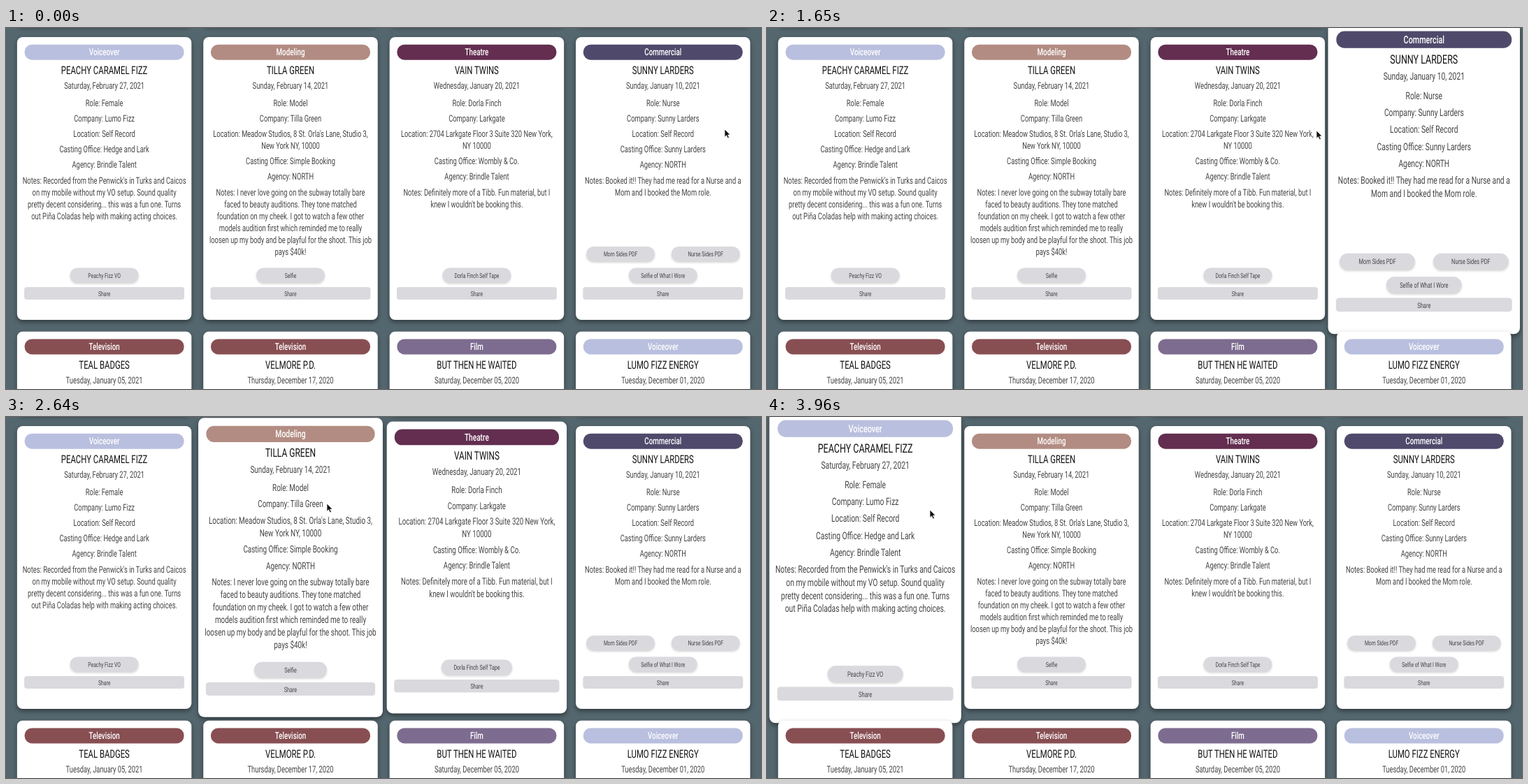
An HTML page that plays this animation: 1080 px wide and 517 px high, repeating every 4.07 s.

```html
<!DOCTYPE html>
<html lang="en">
<head>
<meta charset="utf-8">
<title>Audition cards</title>
<style>
  html, body { margin: 0; width: 100%; height: 100%; overflow: hidden; background: #54666e; }
  svg { display: block; width: 100%; height: 100%; }
  text { font: 400 13.2px Roboto, "Open Sans", sans-serif; fill: #444; text-anchor: middle; text-rendering: geometricPrecision; }
  .tag { font-size: 13.8px; font-weight: 500; fill: #fff; }
  .title { font-size: 16px; fill: #111; }
  .label { font-size: 9.6px; }
  .sheet { fill: #fff; filter: drop-shadow(0 3px 3px rgba(0, 0, 0, .42)); }
  .button { fill: #dad9de; filter: drop-shadow(0 2px 1.5px rgba(0, 0, 0, .17)); }
  .share { fill: #dad9de; }
  .zoom { transform-origin: 0 215.5px; }
</style>
</head>
<body>
<svg id="stage" viewBox="0 0 1080 517"></svg>
<script>
const LOOP = 4070, TICK = 110, CONDENSE = 0.71, ROW = 421.7;
const stage = document.getElementById('stage');
const columnX = i => 140.6 + i * 266.4;

const tagColors = {
  Voiceover: '#b9bfde', Modeling: '#b28c82', Theatre: '#632e50',
  Commercial: '#4f4a6b', Television: '#884f53', Film: '#7e6c90'
};

// Each detail is a paragraph; "|" breaks a line. Buttons are [label, x, y].
const cards = [
  { tag: 'Voiceover', title: 'PEACHY CARAMEL FIZZ', date: 'Saturday, February 27, 2021',
    details: ['Role: Female', 'Company: Lumo Fizz', 'Location: Self Record',
      'Casting Office: Hedge and Lark', 'Agency: Brindle Talent',
      "Notes: Recorded from the Penwick's in Turks and Caicos|on my mobile without my VO setup. Sound quality|pretty decent considering... this was a fun one. Turns|out Piña Coladas help with making acting choices."],
    buttons: [['Peachy Fizz VO', 0, 354]] },
  { tag: 'Modeling', title: 'TILLA GREEN', date: 'Sunday, February 14, 2021',
    details: ['Role: Model', 'Company: Tilla Green',
      "Location: Meadow Studios, 8 St. Orla's Lane, Studio 3,|New York NY, 10000",
      'Casting Office: Simple Booking', 'Agency: NORTH',
      'Notes: I never love going on the subway totally bare|faced to beauty auditions. They tone matched|foundation on my cheek. I got to watch a few other|models audition first which reminded me to really|loosen up my body and be playful for the shoot. This job|pays $40k!'],
    buttons: [['Selfie', 0, 354]] },
  { tag: 'Theatre', title: 'VAIN TWINS', date: 'Wednesday, January 20, 2021',
    details: ['Role: Dorla Finch', 'Company: Larkgate',
      'Location: 2704 Larkgate Floor 3 Suite 320 New York,|NY 10000',
      'Casting Office: Wombly & Co.', 'Agency: Brindle Talent',
      "Notes: Definitely more of a Tibb. Fun material, but I|knew I wouldn't be booking this."],
    buttons: [['Dorla Finch Self Tape', 0, 354]] },
  { tag: 'Commercial', title: 'SUNNY LARDERS', date: 'Sunday, January 10, 2021',
    details: ['Role: Nurse', 'Company: Sunny Larders', 'Location: Self Record',
      'Casting Office: Sunny Larders', 'Agency: NORTH',
      'Notes: Booked it!! They had me read for a Nurse and a|Mom and I booked the Mom role.'],
    buttons: [['Mom Sides PDF', -60.7, 323.5], ['Nurse Sides PDF', 61, 323.5], ['Selfie of What I Wore', 0, 354]] },
  { tag: 'Television', title: 'TEAL BADGES', date: 'Tuesday, January 05, 2021' },
  { tag: 'Television', title: 'VELMORE P.D.', date: 'Thursday, December 17, 2020' },
  { tag: 'Film', title: 'BUT THEN HE WAITED', date: 'Saturday, December 05, 2020' },
  { tag: 'Voiceover', title: 'LUMO FIZZ ENERGY', date: 'Tuesday, December 01, 2020' }
];

function add(parent, name, attrs, content = '') {
  const el = document.createElementNS('http://www.w3.org/2000/svg', name);
  for (const key in attrs) el.setAttribute(key, attrs[key]);
  el.textContent = content;
  return parent.appendChild(el);
}

const box = (parent, cls, x, y, width, height, rx, fill = '') =>
  add(parent, 'rect', { class: cls, x: x - width / 2, y, width, height, rx, ...(fill && { fill }) });

const write = (parent, cls, content, x, baseline) =>
  add(parent, 'text', { class: cls, transform: `translate(${x} ${baseline}) scale(${CONDENSE} 1)` }, content);

function drawCard(column, row, card) {
  const place = add(stage, 'g', { transform: `translate(${columnX(column)} ${row * ROW})` });
  const g = add(place, 'g', { class: 'zoom' });
  box(g, 'sheet', 0, 13, 249.5, 405, 8);
  if (!card) return g;

  box(g, '', 0, 23.7, 228, 22, 10.5, tagColors[card.tag]);
  write(g, 'tag', card.tag, 0, 39.4);
  write(g, 'title', card.title, 0, 66);
  write(g, '', card.date, 0, 87);

  let y = 112;
  for (const paragraph of card.details || []) {
    const lines = paragraph.split('|');
    lines.forEach((line, i) => write(g, '', line, 0, y + i * 17));
    y += 22.1 + (lines.length - 1) * 17;
  }
  for (const [label, x, middle] of card.buttons || []) {
    box(g, 'button', x, middle - 10.5, 98, 21, 10.5);
    write(g, 'label', label, x, middle + 3.5);
  }
  if (card.buttons) {
    box(g, 'share', 0, 371, 229, 18, 4);
    write(g, 'label', 'Share', 0, 384);
  }
  return g;
}

for (let i = 0; i < 4; i++) drawCard(i, -1);
const groups = cards.map((card, i) => drawCard(i % 4, Math.floor(i / 4), card));

const pointer = add(stage, 'g', {});
add(pointer, 'path', {
  d: 'M0 0V11.2L2.6 8.8L4.4 12.8L6.4 11.9L4.6 8H8Z',
  fill: '#111', stroke: '#fff', 'stroke-width': 0.7, 'stroke-linejoin': 'round'
});

function timeline(el, frames) {
  const animation = el.animate(frames, { duration: LOOP, fill: 'both' });
  animation.pause();
  return animation;
}

// [card, hover start, hover end]; no end means held until the loop restarts
const hovers = [[3, 635, 1670], [2, 1680, 2520], [1, 2540, 3540], [0, 3550]];
const EASE_TIME = 300;
const scaleAt = (time, scale, easing = 'linear') =>
  ({ offset: time / LOOP, transform: `scale(${scale})`, easing });

const animations = hovers.map(([card, enter, leave]) => timeline(groups[card], [
  scaleAt(0, 1),
  scaleAt(enter, 1, 'ease'),
  scaleAt(enter + EASE_TIME, 1.1),
  ...(leave ? [scaleAt(leave, 1.1, 'ease'), scaleAt(leave + EASE_TIME, 1), scaleAt(LOOP, 1)]
            : [scaleAt(LOOP, 1.1)])
]));

const pointerPath = [
  [0, 1028, 145], [620, 1028, 145], [770, 994, 142], [1650, 786, 147], [2090, 665, 133],
  [2640, 459, 124], [3190, 336, 127], [3700, 240, 132], [3960, 233, 133], [LOOP, 233, 133]
];
animations.push(timeline(pointer, pointerPath.map(([time, x, y]) =>
  ({ offset: time / LOOP, transform: `translate(${x}px, ${y}px)` }))));

// The picture advances in even ticks, like a screen recording.
const start = performance.now();
function render() {
  const elapsed = (performance.now() - start) % LOOP;
  const time = Math.floor(elapsed / TICK) * TICK;
  for (const animation of animations) animation.currentTime = time;
  requestAnimationFrame(render);
}
render();
</script>
</body>
</html>
```
